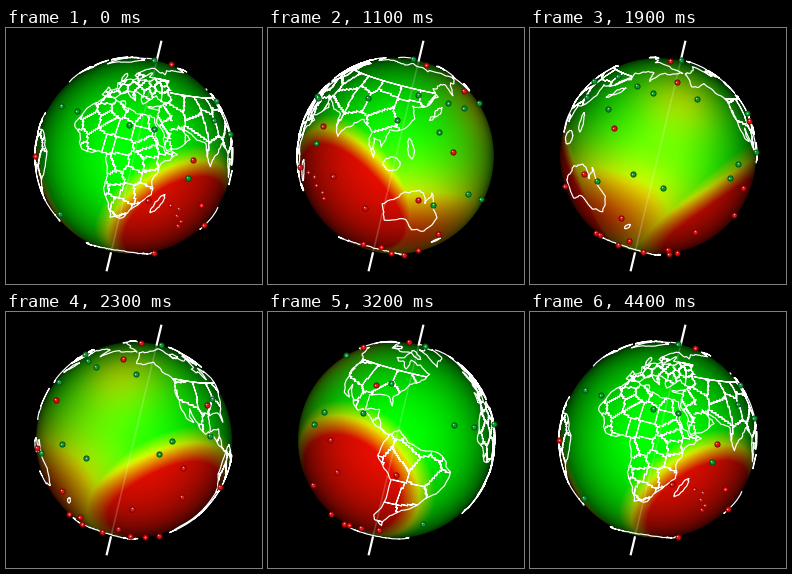
Write a matplotlib script that moves like this. It is 256x256 px and loops after 4.5 s.

```python
import numpy as np
import matplotlib.pyplot as plt
from matplotlib.animation import FuncAnimation
from matplotlib.path import Path

SIZE, DPI, STEPS = 256, 100, 44
PX = 72 / DPI
CX = CY = 128.0
R = 98.0
ROLL, PITCH = np.radians(13.4), np.radians(6)
START = 25.5
rng = np.random.default_rng(4)

# Key points (lon, lat) of each coast; detail is added by roughen()
AFRICA = [(-6, 36), (10, 37), (11, 34), (20, 31), (33, 31), (43, 12), (51, 12), (39, -6), (41, -14),
          (35, -22), (28, -33), (19, -35), (12, -17), (13, -9), (9, 4), (-8, 4), (-17, 14), (-13, 27)]
EURASIA = [(-9, 37), (-9, 43), (-1, 44), (-4, 48), (8, 54), (10, 57), (12, 54), (22, 56), (30, 60),
           (22, 60), (24, 65), (17, 60), (13, 56), (6, 58), (12, 66), (26, 71), (42, 66), (70, 73),
           (105, 77), (140, 72), (188, 66), (163, 60), (157, 51), (154, 59), (136, 54), (140, 48),
           (128, 39), (119, 38), (122, 30), (108, 20), (106, 9), (100, 13), (103, 2), (98, 16),
           (90, 22), (80, 14), (77, 8), (72, 21), (58, 26), (50, 29), (55, 25), (59, 22), (44, 13),
           (35, 28), (36, 36), (27, 37), (41, 41), (32, 46), (23, 38), (13, 45), (17, 39), (9, 44),
           (-1, 37)]
AUSTRALIA = [(142, -11), (146, -19), (153, -26), (150, -37), (140, -38), (135, -34), (131, -31),
             (118, -35), (114, -24), (122, -18), (131, -12), (137, -12), (140, -18)]
NORTH_AMERICA = [(-168, 66), (-156, 71), (-115, 68), (-82, 69), (-94, 60), (-79, 52), (-77, 61),
                 (-56, 52), (-66, 44), (-76, 36), (-81, 31), (-80, 25), (-84, 30), (-97, 28),
                 (-96, 19), (-87, 21), (-83, 10), (-77, 8), (-86, 11), (-105, 20), (-113, 31),
                 (-110, 23), (-124, 40), (-124, 48), (-145, 60), (-162, 55)]
SOUTH_AMERICA = [(-77, 8), (-72, 12), (-51, 4), (-35, -6), (-41, -22), (-57, -37), (-66, -48),
                 (-67, -55), (-75, -50), (-70, -18), (-81, -5)]
GREENLAND = [(-45, 60), (-54, 70), (-68, 76), (-45, 83), (-18, 80), (-22, 71)]

# Islands as ellipses: lon, lat, half length, half width, tilt
ISLANDS = [(46.7, -19, 7, 2, 70), (137, 36, 7, 1.5, 45), (114, 1, 5, 4, 20), (-2.5, 54, 4, 2, 110),
           (170, -44, 3.2, 1.2, 45), (123, 12, 6, 1.8, 110), (-74, 68, 9, 3, -25),
           (-110, 71, 8, 2.5, 0)]

# Markers (lon, lat)
GREEN = [(61, 0), (18, 23), (34, 24), (-20.5, 22), (-38, 21.5), (-32, -45), (146, -18), (169, -8),
         (188, -11.5), (-124, 10), (-130, 1), (-96.5, 16.5), (-86, 39), (149, 45), (165, 43),
         (139.5, 25), (111, 26.6), (202, 46.5), (85, 35.7), (122, 47), (0, 86)]
RED = [(62, 10.5), (40, -18), (79, -15.5), (103, -30), (150, 15), (135, -16.5), (-113, -4),
       (-136, -37), (-106, -22), (165, -38), (-96, 35), (182, 56), (145, 80), (-68, -14)]
SOUTH_RING = [(lon, -65 + 7 * np.cos(lon / 9)) for lon in range(100, 310, 24)]
CLUSTER = np.column_stack([rng.uniform(54, 70, 5), rng.uniform(-35, -16, 5)])

# Warm regions: lon, lat, strength, reach
WARM_GLOW = [(125, -45, 0.72, 40), (180, -30, 0.42, 40), (190, 45, 0.4, 28)]
# Hot regions with a clear rim: lon, lat, radius, rim width
HOT_CAPS = [(73, -32, 42, 20), (-100, -33, 44, 22)]


def unit(lon, lat):
    lon, lat = np.radians(lon), np.radians(lat)
    return np.array([np.cos(lat) * np.sin(lon), np.sin(lat), np.cos(lat) * np.cos(lon)])


def project(lon, lat, center, scale):
    """Screen x and y; points hidden by the globe become NaN."""
    e, n, f = unit(lon - center, lat) * scale
    a = n * np.cos(PITCH) - f * np.sin(PITCH)
    z = n * np.sin(PITCH) + f * np.cos(PITCH)
    x = e * np.cos(ROLL) + a * np.sin(ROLL)
    y = a * np.cos(ROLL) - e * np.sin(ROLL)
    seen = (z > 0) | (np.hypot(x, y) > 1.003)
    return np.where(seen, CX + R * x, np.nan), np.where(seen, CY - R * y, np.nan)


def roughen(ring):
    """Close a ring and give it a ragged edge by midpoint displacement."""
    pts = np.array([*ring, ring[0]], float)
    for _ in range(3):
        step = np.diff(pts, axis=0)
        side = step[:, ::-1] * [-1, 1]
        mid = pts[:-1] + step / 2 + side * rng.normal(0, 0.09, (len(step), 1))
        out = np.empty((2 * len(pts) - 1, 2))
        out[::2], out[1::2] = pts, mid
        pts = out
    return pts


def ellipse(lon, lat, a, b, tilt):
    t = np.linspace(0, 2 * np.pi, 9)[:-1]
    c, s = np.cos(np.radians(tilt)), np.sin(np.radians(tilt))
    return np.column_stack([lon + a * np.cos(t) * c - b * np.sin(t) * s,
                            lat + a * np.cos(t) * s + b * np.sin(t) * c])


def borders(ring, cell, west=-180, east=200, top=90):
    """Edges of random cells inside a ring; north of top is one cell."""
    lo, hi = np.floor(ring.min(0)), np.ceil(ring.max(0))
    lon, lat = np.meshgrid(np.arange(lo[0], hi[0] + 1), np.arange(lo[1], hi[1] + 1))
    inside = Path(ring).contains_points(np.column_stack([lon.ravel(), lat.ravel()]))
    inside = inside.reshape(lon.shape) & (lon >= west) & (lon <= east)
    sx, sy = np.meshgrid(np.arange(lo[0], hi[0] + cell, cell), np.arange(lo[1], hi[1] + cell, cell))
    seeds = np.column_stack([sx.ravel(), sy.ravel()])
    seeds += rng.uniform(-0.45, 0.45, seeds.shape) * cell
    label = np.hypot(lon[..., None] - seeds[:, 0], lat[..., None] - seeds[:, 1]).argmin(-1)
    label[lat > top] = -1
    lines = []
    for dx, dy in ((1, 0), (0, 1)):
        h, w = label.shape
        a, b = np.s_[:h - dy, :w - dx], np.s_[dy:, dx:]
        edge = (label[a] != label[b]) & inside[a] & inside[b]
        for x, y in zip(lon[a][edge] + dx / 2, lat[a][edge] + dy / 2):
            lines.append([(x - dy / 2, y - dx / 2), (x + dy / 2, y + dx / 2)])
    return lines


def join(paths):
    gap = [(np.nan, np.nan)]
    return np.concatenate([np.concatenate([p, gap]) for p in paths]).T


def build_map():
    africa, eurasia, australia, north, south, greenland = map(
        roughen, (AFRICA, EURASIA, AUSTRALIA, NORTH_AMERICA, SOUTH_AMERICA, GREENLAND))
    lon = np.arange(-180, 181, 2.0)
    ice = np.column_stack([lon, -71 + 5 * np.cos(np.radians(lon - 95))
                           + rng.normal(0, 0.5, len(lon))])
    paths = [africa, eurasia, australia, north, south, greenland, ice]
    paths += [roughen(ellipse(*spec)) for spec in ISLANDS]
    paths += borders(africa, 9)
    paths += borders(eurasia, 7, east=45, top=60)
    paths += borders(eurasia, 15, west=45, top=50)
    paths += borders(north, 18, top=49)
    paths += borders(south, 14)
    return join(paths)


# Per-pixel globe coordinates
gx, gy = np.meshgrid(np.arange(SIZE) + 0.5, np.arange(SIZE) + 0.5)
px, py = (gx - CX) / R, (CY - gy) / R
rho = np.hypot(px, py)
depth = np.sqrt(np.clip(1 - rho ** 2, 0, 1))
right = px * np.cos(ROLL) - py * np.sin(ROLL)
along = px * np.sin(ROLL) + py * np.cos(ROLL)
up = along * np.cos(PITCH) + depth * np.sin(PITCH)
front = depth * np.cos(PITCH) - along * np.sin(PITCH)
shade = np.clip(0.14 + 0.88 * depth ** 1.15, 0, 1) * np.clip((1 - rho) * R + 0.5, 0, 1)


def distance(lon, lat, center):
    e, n, f = unit(lon - center, lat)
    return np.degrees(np.arccos(np.clip(right * e + up * n + front * f, -1, 1)))


def globe(center):
    heat = np.zeros_like(rho)
    for lon, lat, radius, width in HOT_CAPS:
        heat += np.clip(0.5 + (radius - distance(lon, lat, center)) / width, 0, 1)
    for lon, lat, strength, reach in WARM_GLOW:
        heat += strength * np.exp(-(distance(lon, lat, center) / reach) ** 2)
    heat = np.clip(heat, 0, 0.97)
    rgb = np.stack([np.clip(1.8 * heat, 0, 0.92), np.clip(1.8 - 1.8 * heat, 0, 1),
                    np.zeros_like(heat)], axis=-1)
    return rgb * shade[..., None]


map_lon, map_lat = build_map()

fig = plt.figure(figsize=(SIZE / DPI, SIZE / DPI), dpi=DPI, facecolor="black")
ax = fig.add_axes([0, 0, 1, 1])
ax.set_xlim(0, SIZE)
ax.set_ylim(SIZE, 0)
ax.axis("off")

surface = ax.imshow(np.zeros((SIZE, SIZE, 3)), extent=(0, SIZE, SIZE, 0),
                    interpolation="nearest", aspect="auto", zorder=1)


def axis_line(a, b, **style):
    s = np.array([a, b])
    ax.plot(CX + s * np.sin(ROLL), CY - s * np.cos(ROLL), color="white",
            solid_capstyle="butt", zorder=2, **style)


axis_line(97, 118.5, lw=2.2 * PX)
axis_line(-99, -118.5, lw=2.2 * PX)
axis_line(-98, 97, lw=1.6 * PX, alpha=0.2)
coast, = ax.plot([], [], color="white", lw=1.2 * PX, zorder=3)


def markers(points, fill, edge, size):
    lon, lat = np.array(points, float).T
    style = dict(ls="none", marker="o", zorder=4)
    ball, = ax.plot([], [], ms=size * PX, mfc=fill, mec=edge, mew=0.9 * PX, **style)
    glint, = ax.plot([], [], ms=1.5 * PX, mfc="white", mec="none", alpha=0.65, **style)
    return lon, lat, ball, glint


groups = [markers(GREEN, "#0a9a32", "#004a12", 5.2),
          markers(RED + SOUTH_RING, "#e01414", "#700000", 5.2),
          markers(CLUSTER, "#ee1c1c", "#900000", 3.4)]


def draw(i):
    center = START + 360 * i / STEPS
    surface.set_data(globe(center))
    coast.set_data(*project(map_lon, map_lat, center, 1.012))
    artists = [surface, coast]
    for lon, lat, ball, glint in groups:
        x, y = project(lon, lat, center, 1.01)
        ball.set_data(x, y)
        glint.set_data(x - 0.6, y - 0.6)
        artists += [ball, glint]
    return artists


anim = FuncAnimation(fig, draw, frames=STEPS + 1, interval=100, repeat=True, repeat_delay=0)
plt.show()
```
